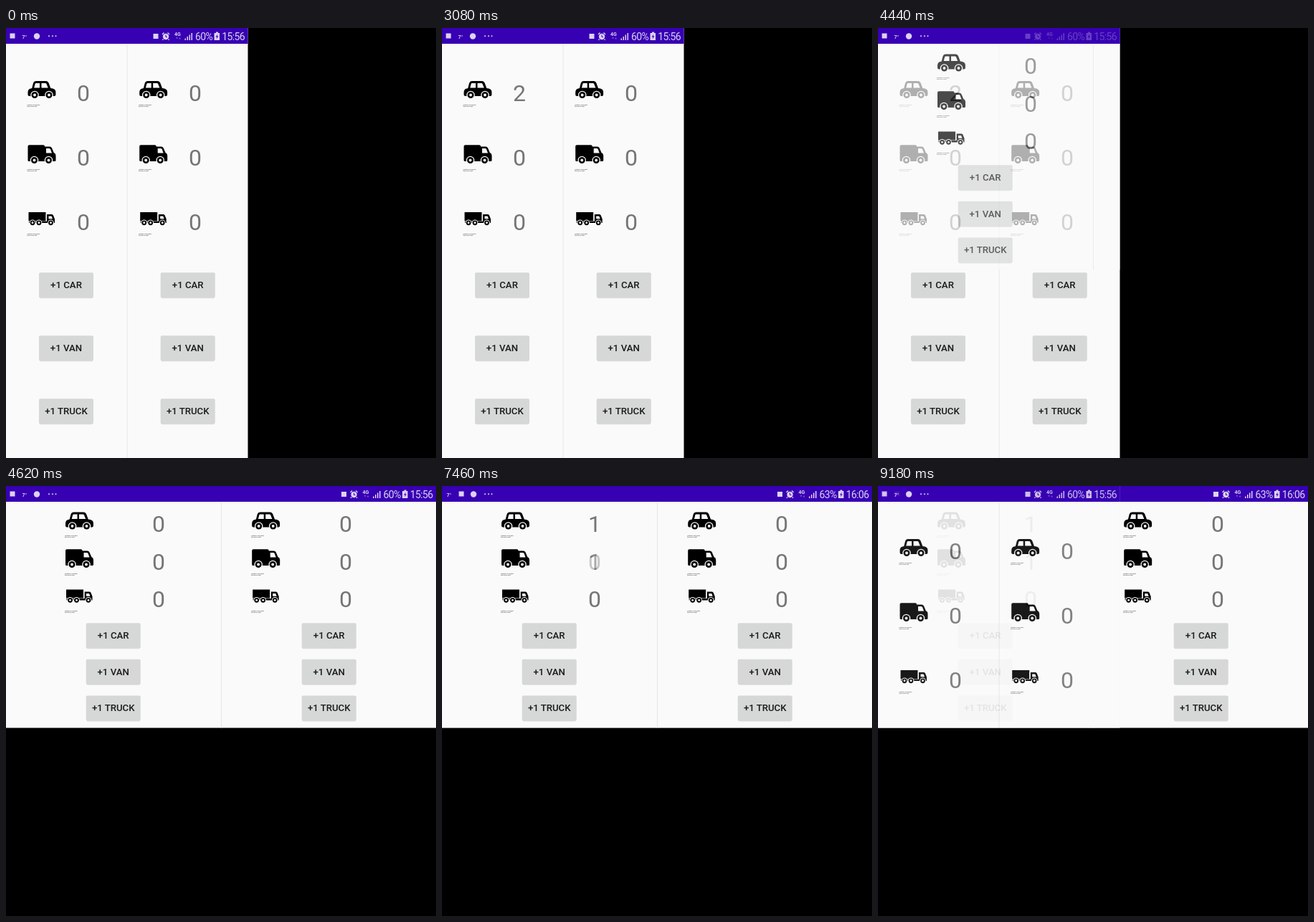
An HTML page that plays this animation: 600 px wide and 600 px high, repeating every 9240 ms.

```html
<!DOCTYPE html>
<html lang="en">
<head>
<meta charset="utf-8">
<title>Vehicle counter</title>
<style>
  html, body { margin: 0; width: 100%; height: 100%; overflow: hidden; background: #000; }
  svg { display: block; width: 100vw; height: 100vh; }
  text { font-family: Roboto, "Noto Sans", sans-serif; }
  .count { font-size: 32px; fill: #757575; text-anchor: middle; }
  .label { font-size: 13.2px; font-weight: 450; fill: #1b1b1b; text-anchor: middle; }
  .credit { font-size: 1.7px; }
  .status { fill: #ddd2f1; }
  .clock { font-size: 14px; letter-spacing: -.6px; }
  .end { text-anchor: end; }
  .small { font-size: 7px; font-weight: 700; }
</style>
</head>
<body>
<svg viewBox="0 0 600 600">
  <defs>
    <g id="wheel">
      <circle r="5.8" fill="#fafafa"/>
      <circle r="4.5"/>
      <circle r="1.9" fill="#fafafa"/>
    </g>

    <g id="car">
      <path d="M-19.500 0Q-19.500-5-15.500-5.500L-13.800-6-12-13Q-11-16-8-16H6Q8.500-16 9.500-13.500L12.300-6Q19.200-5.500 19.400-1V3Q19.400 5 17.500 5H-17.500Q-19.500 5-19.500 3Z"/>
      <path d="M-10.800-6.500-9.300-12.200Q-9-13-8-13H-3V-6.500ZM-.5-6.500V-13H5Q6-13 6.400-12.200L8.700-6.500Z" fill="#fafafa"/>
      <use href="#wheel" x="-10" y="3.500"/>
      <use href="#wheel" x="10" y="3.500"/>
    </g>

    <g id="van">
      <path d="M-19.500-15Q-19.500-16.800-17.500-16.800H2Q4-16.800 4-15V-14.500H11Q13-14.500 14-12.500L16.800-6Q19.500-5 19.500-2V4.500Q19.500 6 18 6H-18Q-19.500 6-19.500 4.500Z"/>
      <path d="M6-12H10.300Q11.500-12 12-10.800L14-5.500H6Z" fill="#fafafa"/>
      <use href="#wheel" x="-10.500" y="4.500"/>
      <use href="#wheel" x="9.500" y="4.500"/>
    </g>

    <g id="truck">
      <path d="M-18.500-13H5.500V-1H-18.500ZM-18-.4H7V-10H14Q15.500-10 16-8.500L18-3.500V2H-18Z"/>
      <path d="M9.500-7.500H13.500L15-3.700H9.500Z" fill="#fafafa"/>
      <path d="M6.300-10V-.5" stroke="#fafafa"/>
      <use href="#wheel" transform="translate(-13 1.800) scale(.75)"/>
      <use href="#wheel" transform="translate(-4 1.800) scale(.75)"/>
      <use href="#wheel" transform="translate(12.500 1.800) scale(.75)"/>
    </g>

    <g id="alarm">
      <circle cy=".5" r="4.2"/>
      <path d="M-5-2.500-2.500-5M5-2.500 2.500-5M-3.500 4-4.500 5.300M3.500 4 4.500 5.300" stroke="#ddd2f1" stroke-width="1.400"/>
      <path d="M0-2V1H2" fill="none" stroke="#3700b3"/>
    </g>

    <clipPath id="shared"><rect id="window"/></clipPath>
    <g id="slides"></g>
  </defs>

  <rect width="600" height="600"/>
  <use id="base"/>
  <g clip-path="url(#shared)"><use id="over"/></g>
</svg>

<script>
const HOLD = 1000, STEP = 60, STEPS = 9, SLOT = HOLD + STEP * STEPS;
const LONG = 600, SHORT = LONG * 9 / 16, BAR = 22;
const VEHICLES = ['car', 'van', 'truck'];

const portrait = {
  w: SHORT, h: LONG, divider: 169,
  icons: [50, 205.7], counts: [108, 264], rows: [90, 180, 270],
  buttons: [84, 253.7], buttonRows: [358.8, 446.8, 534.8]
};
const landscape = {
  w: LONG, h: SHORT, divider: 300.5,
  icons: [102.5, 362.7], counts: [213, 474], rows: [52.5, 105, 157.5],
  buttons: [149.7, 450.7], buttonRows: [208.7, 259.2, 309.9]
};

const early = { time: '15:56', charge: '60%', square: 9, temp: 26, disc: 43 };
const late = { time: '16:06', charge: '63%', square: 27, temp: 10, disc: 44 };

// Each slide: layout, status bar, counts of the left column
const slides = [
  [portrait, early, [0, 0, 0]],
  [portrait, early, [1, 0, 0]],
  [portrait, early, [2, 0, 0]],
  [landscape, early, [0, 0, 0]],
  [landscape, late, [1, 0, 0]],
  [landscape, late, [1, 1, 0]]
];

const text = (x, y, cls, s) => `<text x="${x}" y="${y}" class="${cls}">${s}</text>`;
const rect = (x, y, w, h, more = '') =>
  `<rect x="${x}" y="${y}" width="${w}" height="${h}" ${more}/>`;
const disc = (x, y, r) => `<circle cx="${x}" cy="${y}" r="${r}"/>`;

function statusBar(w, s) {
  const bars = [0, 1, 2, 3].map(i => rect(249.5 + i * 3, 14.5 - i * 2.5, 1.5, 2.5 + i * 2.5));
  const dots = [60, 65, 69.5].map(x => disc(x, 11.3, 1));
  return rect(0, 0, w, BAR, 'fill="#3700b3"') +
    `<g class="status">
      ${rect(s.square - 3.5, 7.5, 7, 7)}
      ${text(s.temp - 3.5, 14.5, 'small', '7°')}
      ${disc(s.disc, 11.5, 4.2)}
      ${dots.join('')}
      <g transform="translate(${w - SHORT})">
        ${rect(205.5, 8, 7, 7)}
        <use href="#alarm" x="223" y="11.500"/>
        ${text(235, 10.5, 'small', '4G')}
        <path d="M237 13l1.500 2.500L240 13ZM241 15.500l1.500-2.500 1.500 2.500Z" opacity=".4"/>
        ${bars.join('')}
        ${text(264, 16.8, 'clock', s.charge)}
        <path d="M293 5.500h3v1.500h2v10h-7.500V7H293Z"/>
        <path d="M295.500 8.500l-3 4h2l-1 3 3-4h-2Z" fill="#3700b3"/>
        ${text(333, 16.8, 'clock end', s.time)}
      </g>
    </g>`;
}

function button(x, y, name) {
  return rect(x - 37.5, y - 16, 75, 34.5, 'rx="2" opacity=".12"') +
    rect(x - 38, y - 17.5, 76, 35, 'rx="2" fill="#d6d7d7"') +
    text(x, y + 4.5, 'label', '+1 ' + name.toUpperCase());
}

function vehicleRow(L, col, row, count) {
  const x = L.icons[col], y = L.rows[row];
  return `<use href="#${VEHICLES[row]}" x="${x}" y="${y}"/>` +
    text(x - 20.5, y + 17.8, 'credit', 'Created by a local artist') +
    text(x - 20.5, y + 19.8, 'credit', 'from an icon shelf') +
    text(L.counts[col], y + 11.6, 'count', count);
}

function slide([L, status, counts], i) {
  let out = rect(0, 0, L.w, L.h, 'fill="#fafafa"') +
    rect(L.divider - .5, BAR, 1, L.h - BAR, 'fill="#e6e6e6"') + statusBar(L.w, status);
  for (const col of [0, 1])
    for (const row of [0, 1, 2])
      out += vehicleRow(L, col, row, col ? 0 : counts[row]) +
        button(L.buttons[col], L.buttonRows[row], VEHICLES[row]);
  return `<g id="slide${i}">${out}</g>`;
}

const $ = id => document.getElementById(id);
$('slides').innerHTML = slides.map(slide).join('');

let shown = -1;

function draw(now) {
  const t = now % (SLOT * slides.length);
  const i = Math.floor(t / SLOT), next = (i + 1) % slides.length;
  const step = Math.max(0, Math.floor((t % SLOT - HOLD) / STEP) + 1);
  if (i !== shown) {
    shown = i;
    const a = slides[i][0], b = slides[next][0];
    $('base').setAttribute('href', '#slide' + i);
    $('over').setAttribute('href', '#slide' + next);
    // Only the area both screens cover is blended
    $('window').setAttribute('width', Math.min(a.w, b.w));
    $('window').setAttribute('height', Math.min(a.h, b.h));
  }
  $('over').setAttribute('opacity', step / (STEPS + 1));
}

const start = performance.now();
function tick() {
  draw(performance.now() - start);
  requestAnimationFrame(tick);
}
tick();
</script>
</body>
</html>
```
